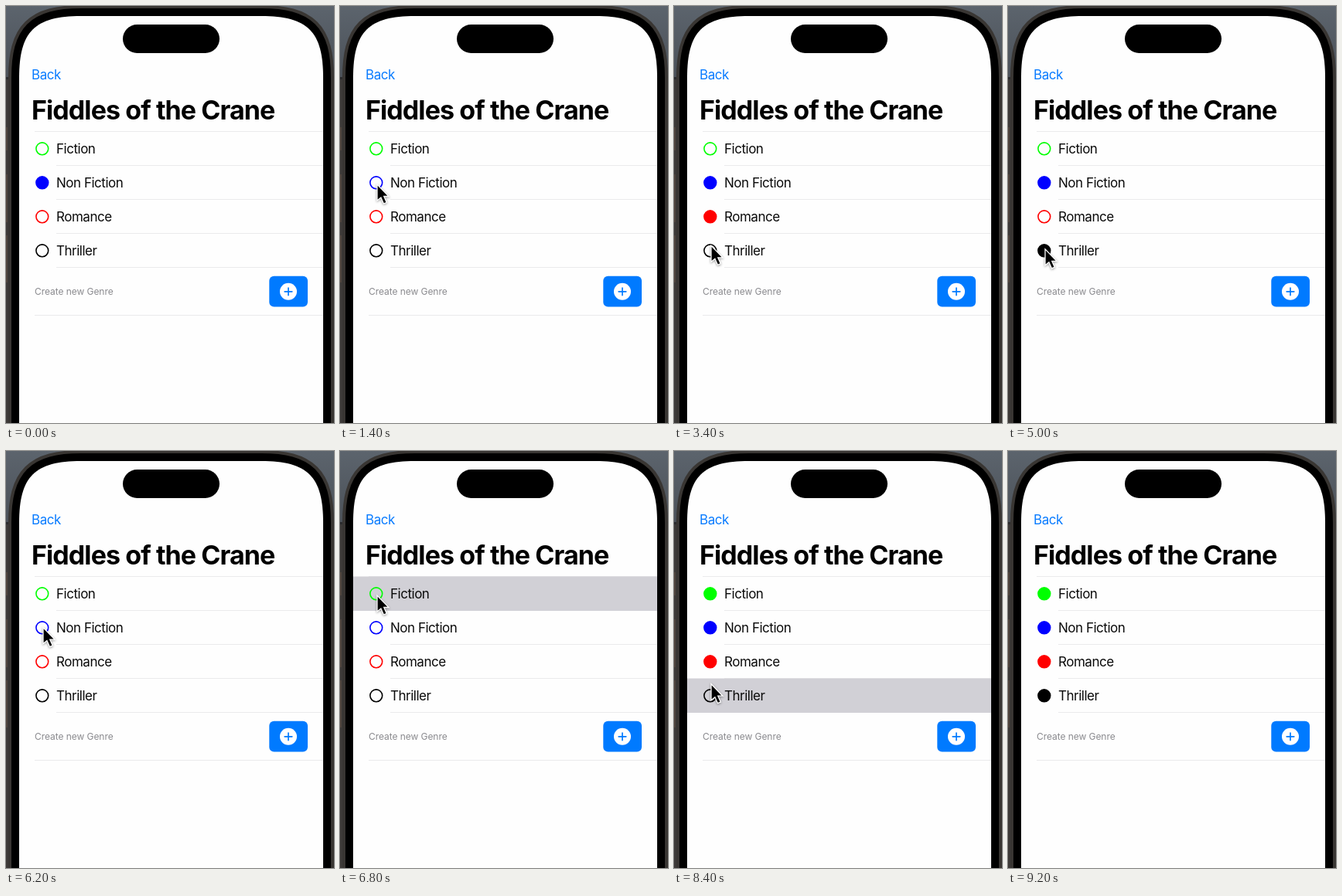
Animation of 424 by 540 pixels, one loop 9.6 s. Source, as an HTML page:

```html
<!DOCTYPE html>
<html lang="en">
<head>
<meta charset="utf-8">
<title>Genre picker</title>
<style>
  html, body { margin: 0; width: 100%; height: 100%; overflow: hidden; background: #393a3c; }
  svg { display: block; width: 424px; height: 540px; }
  text { font-family: Inter, sans-serif; font-size: 17px; letter-spacing: -.48px; fill: #0a0a0a; }
  .back { fill: #0a7cff; }
  .title { font-size: 34px; font-weight: 700; letter-spacing: -.92px; fill: #000; }
  .hint { font-size: 12px; letter-spacing: -.06px; fill: #8a8a8e; }
  .line { stroke: #eaeaec; }
  .press { fill: #d1d0d6; }
  #cursor { filter: drop-shadow(0 1.5px 1.5px #0006); }
</style>
</head>
<body>
<svg viewBox="0 0 424 540">
  <defs>
    <linearGradient id="wall" x2="0" y2="1">
      <stop offset="0" stop-color="#5c646d"/>
      <stop offset="1" stop-color="#4b5158"/>
    </linearGradient>
    <path id="screen" d="M17 600V93C17 33 37 13 97 13H330C390 13 410 33 410 93V600Z"/>
  </defs>
  <rect width="424" height="540" fill="#3d3a38"/>
  <rect width="424" height="92" fill="url(#wall)"/>
  <rect y="92" width="424" height="3" fill="#2b2c2e"/>
  <path d="M1 157v30M1 218v62M1 297v61" stroke="#4f443d" stroke-width="2"/>
  <use href="#screen" stroke="#393633" stroke-width="28"/>
  <use href="#screen" stroke="#000" stroke-width="20"/>
  <use href="#screen" fill="#fefefe"/>
  <rect x="151" y="24" width="125" height="37" rx="18.5"/>
  <text class="back" x="33" y="95">Back</text>
  <text class="title" x="33" y="147">Fiddles of the Crane</text>
  <path class="line" d="M37 162.5H410M37 400.5H410"/>
  <g id="rows"></g>
  <text class="hint" x="37" y="374">Create new Genre</text>
  <rect x="340.3" y="349.7" width="49.7" height="39.8" rx="6" fill="#007aff"/>
  <circle cx="365" cy="369.8" r="11" fill="#fff"/>
  <path d="M360.2 369.8h9.6M365 365v9.6" stroke="#007aff" stroke-width="1.7" stroke-linecap="round"/>
  <path id="cursor" d="M0 0V21L4.9 17L8.5 25L12.3 23.4L8.8 15.5H15Z" stroke="#fff" stroke-width="1.3"/>
</svg>
<script>
const STEP = 200, TICKS = 48, ROW = 44, BELOW = 9;
const genres = [["Fiction", "#0f0"], ["Non Fiction", "#00f"], ["Romance", "#f00"], ["Thriller", "#000"]];
const startsFilled = "Non Fiction";

// Pointer script: tick and row of each tap; it enters from and leaves to below the stage
const taps = [[0, BELOW], [6, 1], [10, 1], [14, 2], [19, 3], [21, 2], [27, 3],
  [30, 1], [35, 0], [37, 1], [41, 2], [43, 3], [46, BELOW]];

const cursor = document.getElementById("cursor");
const rows = document.getElementById("rows");
rows.innerHTML = genres.map(([name, color], i) => `
  <g transform="translate(0 ${162 + ROW * i})">
    <path class="line" d="M65 44.5H410"/>
    <rect class="press" x="17" y=".5" width="393" height="44.5"/>
    <circle cx="46.8" cy="22.8" r="7.9" stroke="${color}" stroke-width="1.6"/>
    <text x="65" y="29">${name}</text>
  </g>`).join("");

// Rest briefly after a tap, glide to the next row, settle before tapping
function pointerRow(tick) {
  const next = taps.findIndex(([at]) => at > tick);
  if (next < 0) return BELOW;
  const [t0, from] = taps[next - 1], [t1, to] = taps[next];
  const k = Math.min(1, Math.max(0, ((tick - t0) / (t1 - t0) - .1) / .7));
  return from + (to - from) * k * k * (3 - 2 * k);
}

function draw() {
  const tick = Math.floor(performance.now() / STEP) % TICKS;
  genres.forEach(([name, color], i) => {
    const times = taps.filter(([, row]) => row === i).map(([at]) => at);
    const toggled = times.filter(at => at <= tick).length % 2 === 1;
    const filled = (name === startsFilled) !== toggled;
    const pressed = times.includes(tick + 1);
    rows.children[i].querySelector("circle").setAttribute("fill", filled ? color : "none");
    rows.children[i].querySelector(".press").setAttribute("visibility", pressed ? "visible" : "hidden");
  });
  cursor.setAttribute("transform", `translate(48 ${187 + ROW * pointerRow(tick)})`);
  requestAnimationFrame(draw);
}
draw();
</script>
</body>
</html>
```
